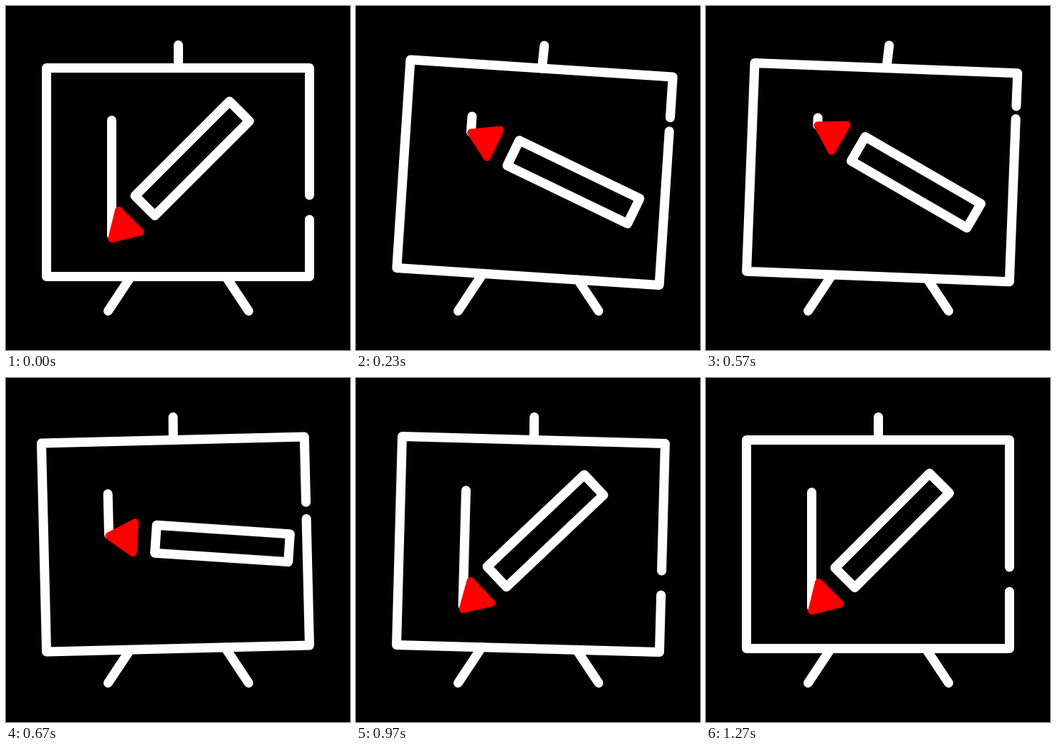
An HTML page with a canvas that plays this animation: 480 px wide and 480 px high, repeating every 1.53 s.

```html
<!DOCTYPE html>
<html>
<head>
<meta charset="utf-8">
<title>Sketch board</title>
<style>
  html, body { margin: 0; width: 100%; height: 100%; overflow: hidden; background: #000; }
  canvas { display: block; width: 480px; height: 480px; }
</style>
</head>
<body>
<canvas id="stage" width="480" height="480"></canvas>
<script>
const ctx = document.getElementById("stage").getContext("2d");
const LOOP = 1530, STEP = 1000 / 30, LAST_STEP = 38;
const RAD = Math.PI / 180;
const LEFT = 56.5, RIGHT = 423.5, TOP = 86.5, BOTTOM = 377.5, MIDDLE = 240.5;

const mix = (a, b, p) => a + (b - a) * p;

function ease(from, to, step) {
  const x = Math.min(1, Math.max(0, (step - from) / (to - from)));
  return x * x * (3 - 2 * x);
}

// Keys are [step, degrees]; the swing eases in and out between them.
const SWING = [[0, 0], [12, 6], [24, -4], [30, 2], [36, 0]];

function swing(step) {
  let angle = 0;
  for (let i = 1; i < SWING.length; i++) {
    const [from, a] = SWING[i - 1], [to, b] = SWING[i];
    angle += (b - a) * ease(from, to, step);
  }
  return angle * RAD;
}

function polyline(points, closed) {
  ctx.beginPath();
  points.forEach(([x, y]) => ctx.lineTo(x, y));
  if (closed) ctx.closePath();
}

function stroke(points, closed) {
  polyline(points, closed);
  ctx.stroke();
}

function rotateAbout(x, y, angle) {
  ctx.translate(x, y);
  ctx.rotate(angle);
  ctx.translate(-x, -y);
}

// Each leg keeps its foot and slope and ends on the tilted lower edge.
function drawLegs(tilt) {
  const slope = 0.663, footY = 425.5, spread = 98;
  for (const side of [-1, 1]) {
    const k = side * Math.tan(tilt);
    const y = (BOTTOM + k * (spread - footY * slope)) / (1 - k * slope);
    const reach = spread - slope * (footY - y);
    stroke([[MIDDLE + side * spread, footY], [MIDDLE + side * reach, y]]);
  }
}

function drawPencil(x, y, angle) {
  ctx.save();
  ctx.translate(x, y);
  ctx.rotate(angle);
  stroke([[65.5, -19.5], [252, -19.5], [252, 19.5], [65.5, 19.5]], true);
  ctx.fillStyle = ctx.strokeStyle = "#f00";
  ctx.lineWidth = 10.5;
  polyline([[0, 0], [35, -21.2], [35, 21.2]], true);
  ctx.fill();
  ctx.stroke();
  ctx.restore();
}

function draw(step) {
  const tilt = swing(step);
  const lift = ease(0, 9.1, step) - ease(15.2, 27.2, step);
  const gap = ease(0, 9.2, step) - ease(15.2, 26.5, step);

  ctx.fillStyle = "#000";
  ctx.fillRect(0, 0, 480, 480);
  ctx.strokeStyle = "#fff";
  ctx.lineWidth = 13;
  ctx.lineCap = ctx.lineJoin = "round";

  drawLegs(tilt);

  ctx.save();
  rotateAbout(MIDDLE, BOTTOM, tilt);
  stroke([
    [RIGHT, mix(264, 123, gap)], [RIGHT, TOP], [LEFT, TOP],
    [LEFT, BOTTOM], [RIGHT, BOTTOM], [RIGHT, mix(298, 139.5, gap)]
  ]);
  stroke([[147.5, 159.5], [147.5, mix(320, 160, lift)]]);
  drawPencil(147.5, mix(325, 160, lift), mix(-45, 32.5, lift) * RAD);

  // The hook trails the board by two steps.
  rotateAbout(MIDDLE, TOP, swing(step - 2));
  stroke([[MIDDLE, TOP], [MIDDLE, 54.5]]);
  ctx.restore();
}

const start = performance.now();

function tick() {
  const time = (performance.now() - start) % LOOP;
  draw(Math.min(LAST_STEP, Math.floor((time + 4) / STEP)));
  requestAnimationFrame(tick);
}
tick();
</script>
</body>
</html>
```
